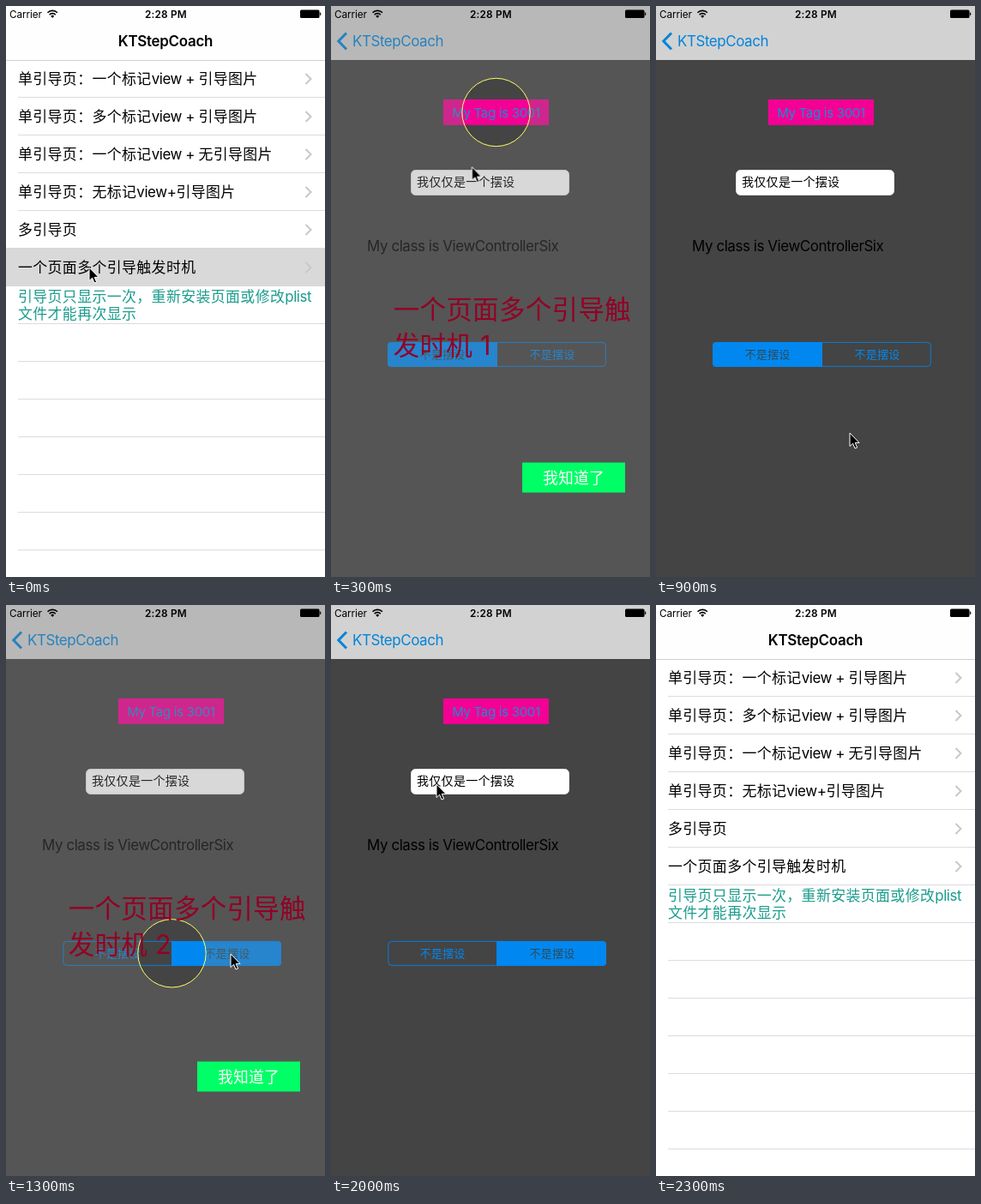
Write an HTML page that moves like this. It is 372x666 px and loops after 2400 ms.

```html
<!DOCTYPE html>
<html lang="zh-CN">
<head>
<meta charset="utf-8">
<title>Page guide</title>
<style>
  html, body { margin: 0; width: 100%; height: 100%; overflow: hidden; background: #fff; }
  svg { display: block; width: 372px; height: 666px; }
  text {
    font: 16.9px Inter, "Noto Sans CJK SC", "Noto Sans CJK", "Noto Sans CJK JP", sans-serif;
    letter-spacing: .4px;
    white-space: pre;
  }
  .en { letter-spacing: -.4px; }
  .mid { text-anchor: middle; }
  .small { font-size: 11.8px; letter-spacing: -.1px; }
  .bold { font-weight: 600; }
  .blue { fill: #0084da; }
  .line { stroke: #dcdbdf; }
  .arrow { fill: none; stroke: #c7c7cc; stroke-width: 2; }
  .seg { font-size: 13px; letter-spacing: .3px; }
  .frame { fill: none; stroke: #0088f0; stroke-opacity: .85; }
  .hint { font-size: 30.5px; letter-spacing: .3px; fill: #930025; }
  .veil { fill: #7f7f7f; fill-opacity: .3; fill-rule: evenodd; }
  .ring { fill: none; stroke: #ffff66; }

  /* 24 poses of 100 ms, each one held */
  .loop { animation: 2.4s step-end infinite; }
  #list { animation-name: list; }
  #dim { animation-name: dim; }
  #press { animation-name: press; }
  #home { animation-name: home; }
  #detail { animation-name: detail; }
  #bar { animation-name: bar; }
  #glow { animation-name: glow; }
  #back { animation-name: back; }
  #chevron { animation-name: chevron; }
  #pick { animation-name: pick; }
  #left { animation-name: left; }
  #right { animation-name: right; }
  #guide1 { animation-name: guide1; }
  #guide2 { animation-name: guide2; }
  #known { animation-name: known; }
  #cursor { animation-name: cursor; }

  @keyframes list {
    0% { transform: translateX(0); }
    4.16% { transform: translateX(-102px); }
    91.66% { transform: translateX(-8px); }
    95.83%, 100% { transform: translateX(0); }
  }
  @keyframes dim {
    0% { opacity: 0; }
    4.16% { opacity: .09; }
    91.66%, 100% { opacity: 0; }
  }
  @keyframes press {
    0% { opacity: 1; }
    91.66% { opacity: .3; }
    95.83%, 100% { opacity: 0; }
  }
  @keyframes home {
    0% { opacity: 1; }
    4.16% { opacity: 0; }
    91.66%, 100% { opacity: 1; }
  }
  @keyframes detail {
    0% { transform: translateX(380px); }
    4.16% { transform: translateX(29px); }
    8.33% { transform: translateX(0); }
    91.66% { transform: translateX(345px); }
    95.83%, 100% { transform: translateX(380px); }
  }
  @keyframes bar {
    0% { opacity: 0; }
    4.16% { opacity: 1; }
    91.66%, 100% { opacity: 0; }
  }
  @keyframes glow {
    0% { opacity: 1; }
    8.33%, 100% { opacity: 0; }
  }
  @keyframes back {
    0% { transform: translateX(8px); }
    8.33%, 100% { transform: translateX(0); }
  }
  @keyframes chevron {
    0% { opacity: .4; }
    8.33%, 100% { opacity: 1; }
  }
  @keyframes pick {
    0% { transform: translateX(0); }
    49.99%, 100% { transform: translateX(127px); }
  }
  @keyframes left {
    0% { fill: #2f4a59; }
    49.99%, 100% { fill: #0088f0; }
  }
  @keyframes right {
    0% { fill: #0088f0; }
    49.99%, 100% { fill: #2f4a59; }
  }
  @keyframes guide1 {
    0% { opacity: 0; }
    12.49% { opacity: 1; }
    33.33%, 100% { opacity: 0; }
  }
  @keyframes guide2 {
    0% { opacity: 0; }
    49.99% { opacity: 1; }
    74.99%, 100% { opacity: 0; }
  }
  @keyframes known {
    0%, 33.33% { opacity: 0; }
    12.49%, 49.99% { opacity: 1; }
    74.99%, 100% { opacity: 0; }
  }
  @keyframes cursor {
    0% { transform: translate(97px, 305px); }
    4.16% { transform: translate(97px, 305px); animation-timing-function: steps(3); }
    16.66% { transform: translate(198px, 129px); animation-timing-function: steps(3); }
    29.16% { transform: translate(285px, 548px); animation-timing-function: steps(2); }
    37.49% { transform: translate(226px, 498px); animation-timing-function: steps(3); }
    49.99% { transform: translate(262px, 407px); }
    54.16% { transform: translate(262px, 407px); animation-timing-function: steps(3); }
    66.66% { transform: translate(289px, 543px); }
    74.99% { transform: translate(289px, 543px); animation-timing-function: steps(3); }
    87.49% { transform: translate(40px, 42px); }
    91.66%, 100% { transform: translate(-40px, -40px); }
  }
</style>
</head>
<body>
<svg viewBox="0 0 372 666">
  <defs>
    <linearGradient id="fade">
      <stop offset="0" stop-color="#f2f2f2"/>
      <stop offset="1" stop-color="#d2d2d2"/>
    </linearGradient>
    <clipPath id="pill"><rect x="66" y="392" width="255" height="29" rx="4"/></clipPath>
  </defs>

  <g id="list" class="loop">
    <rect width="372" height="666" fill="#fff"/>
    <g id="lines"></g>
    <rect id="press" class="loop" y="282" width="372" height="45" fill="#d9d9d9"/>
    <g id="rows"></g>
    <g fill="#1a9c8c">
      <text x="14" y="345">引导页只显示一次，重新安装页面或修改<tspan class="en">plist</tspan></text>
      <text x="14" y="365">文件才能再次显示</text>
    </g>
  </g>
  <rect id="dim" class="loop" width="372" height="666"/>

  <g id="detail" class="loop">
    <rect x="-2" width="376" height="666" fill="#444"/>
    <rect x="130.9" y="109" width="123.1" height="29.9" fill="#f30094"/>
    <text class="mid" x="192.5" y="129.5" fill="#1a8cd4" style="font-size:15px;letter-spacing:-.3px">My Tag is 3001</text>
    <rect x="93.5" y="191.5" width="184" height="29" rx="5" fill="#fff" stroke="#e4e4e4"/>
    <text x="100" y="210.4" style="font-size:14px;letter-spacing:.3px">我仅仅是一个摆设</text>
    <text class="en" x="42" y="286">My class is ViewControllerSix</text>
    <g clip-path="url(#pill)">
      <rect id="pick" class="loop" x="66" y="392" width="128" height="29" fill="#0088f0"/>
    </g>
    <rect class="frame" x="66.8" y="392.4" width="253.6" height="27.9" rx="4"/>
    <path class="frame" d="M193.5 392v29"/>
    <text id="left" class="loop seg mid" x="130" y="411">不是摆设</text>
    <text id="right" class="loop seg mid" x="258" y="411">不是摆设</text>
  </g>

  <g id="home" class="loop">
    <rect width="372" height="63" fill="#fefefe"/>
    <path d="M0 63.5H372" stroke="#d0d0d0"/>
    <text class="bold mid" x="186" y="47" style="letter-spacing:-.25px">KTStepCoach</text>
  </g>
  <g id="bar" class="loop">
    <rect width="372" height="63" fill="#d2d2d2"/>
    <rect id="glow" class="loop" width="110" height="63" fill="url(#fade)"/>
    <path id="chevron" class="loop" d="M18 31.5 8.8 41l9.2 9.5" fill="none" stroke="#0084da" stroke-width="3"/>
    <g id="back" class="loop"><text class="en blue" x="25" y="47">KTStepCoach</text></g>
  </g>

  <g id="guide1" class="loop">
    <path class="veil" d="M0 0H372V666H0ZM152.8 124a39.7 39.7 0 0 0 79.4 0a39.7 39.7 0 0 0-79.4 0Z"/>
    <circle class="ring" cx="192.5" cy="124" r="39.7"/>
    <text class="hint" x="72.7" y="406.7">发时机 1</text>
  </g>
  <g id="guide2" class="loop">
    <path class="veil" d="M0 0H372V666H0ZM153.8 406.3a39.7 39.7 0 0 0 79.4 0a39.7 39.7 0 0 0-79.4 0Z"/>
    <circle class="ring" cx="193.5" cy="406.3" r="39.7"/>
    <text class="hint" x="72.7" y="406.7">发时机 2</text>
  </g>
  <g id="known" class="loop">
    <text class="hint" x="72.7" y="364.7">一个页面多个引导触</text>
    <rect x="223" y="532.5" width="120" height="35" fill="#00ff66"/>
    <text class="mid" x="283" y="556.5" fill="#fff" style="font-size:17.8px;letter-spacing:.2px">我知道了</text>
  </g>

  <g id="status">
    <text class="small" x="4" y="13.5">Carrier</text>
    <path d="M48.5 7.8a8 8 0 0 1 11.4 0M50.6 10.2a5 5 0 0 1 7.2 0" fill="none" stroke="#000" stroke-width="1.6"/>
    <path d="M54.2 14l-2-2.2a2.8 2.8 0 0 1 4 0Z"/>
    <text class="small bold mid" x="186.5" y="13.5" style="letter-spacing:.2px">2:28 PM</text>
    <rect x="343" y="4.5" width="22.5" height="9.5" rx="1.5"/>
    <path d="M366.3 7.5q1.8 1.8 0 3.6Z" stroke="#000" stroke-width=".6"/>
  </g>

  <g id="cursor" class="loop">
    <path d="M0 0V15.5L3.6 12.2 6 18 8.6 17 6.2 11.4H11Z" stroke="#fff"/>
  </g>
</svg>
<script>
  const rowHeight = 44;
  const titles = [
    "单引导页：一个标记view + 引导图片",
    "单引导页：多个标记view + 引导图片",
    "单引导页：一个标记view + 无引导图片",
    "单引导页：无标记view+引导图片",
    "多引导页",
    "一个页面多个引导触发时机"
  ];
  const latin = s => s.replace(/[\w+ ]+/g, m => `<tspan class="en">${m}</tspan>`);

  document.getElementById("rows").innerHTML = titles.map((title, i) => {
    const y = 85 + i * rowHeight;
    return `<text x="14" y="${y + 6}">${latin(title)}</text>
      <path class="arrow" d="M349.5 ${y - 6}l6 6-6 6"/>`;
  }).join("");

  document.getElementById("lines").innerHTML = Array.from({ length: 13 }, (_, i) =>
    `<path class="line" d="M14 ${106.5 + i * rowHeight}H372"/>`).join("");
</script>
</body>
</html>
```
